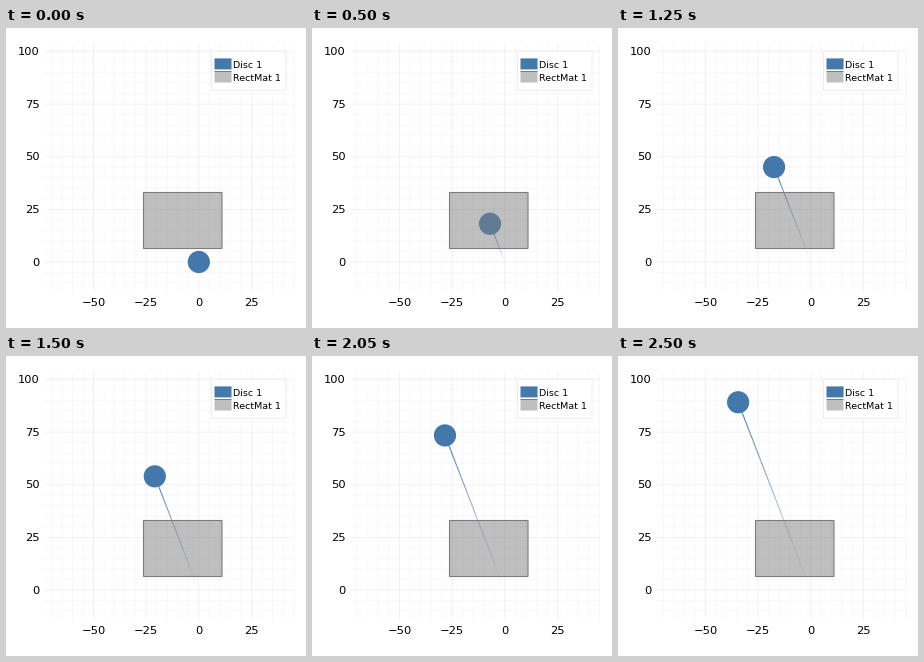
Write a matplotlib script that moves like this. It is 300 px wide and 300 px high and loops after 2.55 s.

```python
import numpy as np
import matplotlib.pyplot as plt
from matplotlib.animation import FuncAnimation
from matplotlib.collections import LineCollection
from matplotlib.colors import to_rgba
from matplotlib.patches import Circle, Rectangle

SIZE, DPI = 300, 100
FRAMES, INTERVAL = 51, 50
PX = 72 / DPI  # points per pixel
BLUE = "#4477aa"
EDGE = "#7c7c7c"
MAT = (0.5, 0.5, 0.5, 0.5)
SCALE = 2.106  # pixels per data unit
X0, Y0 = 192.8, 234  # pixel position of the data origin
LEFT, RIGHT, TOP, BOTTOM = 38.5, 288.5, 15, 264
TICK_SIZE, LEGEND_SIZE = 11.5, 9.5

plt.rcParams["font.family"] = "DejaVu Sans"
fig = plt.figure(figsize=(SIZE / DPI, SIZE / DPI), dpi=DPI, facecolor="white")
ax = fig.add_axes([0, 0, 1, 1])
ax.set_xlim(0, SIZE)
ax.set_ylim(SIZE, 0)
ax.axis("off")


def px(x):
    return X0 + SCALE * x


def py(y):
    return Y0 - SCALE * y


def line(xs, ys, color, alpha=1.0, z=1):
    ax.plot(xs, ys, color=color, alpha=alpha, lw=PX, zorder=z, snap=False,
            solid_capstyle="butt")


def box(x, y, w, h, z, **style):
    ax.add_patch(Rectangle((x, y), w, h, zorder=z, snap=False, **style))


def label(x, y, text, size, **align):
    ax.text(x, y, text, fontsize=size * PX, color="black", zorder=12, **align)


def draw_grid():
    for x in range(-70, 46, 5):
        alpha = 0.055 if x % 25 == 0 else 0.028
        line([px(x)] * 2, [TOP, BOTTOM], "black", alpha)
    for y in range(-10, 101, 5):
        alpha = 0.055 if y % 25 == 0 else 0.028
        line([LEFT, RIGHT], [py(y)] * 2, "black", alpha)
    for x in (-50, -25, 0, 25):
        label(px(x), 277.8, str(x).replace("-", "\u2212"), TICK_SIZE,
              ha="center", va="baseline")
    for y in range(0, 101, 25):
        label(33.8, py(y) + 3.8, str(y), TICK_SIZE, ha="right", va="baseline")


def draw_legend():
    box(205.5, 23.2, 74.5, 39.3, 10, fc="white", ec="#ececec", lw=PX)
    box(208.5, 30.4, 17, 11, 11, fc=BLUE, ec="none")
    box(208.5, 43.5, 17, 11, 11, fc=MAT, ec="none")
    line([208.5, 225.5], [43.5, 43.5], EDGE, z=12)
    label(226.6, 39.9, "Disc 1", LEGEND_SIZE, ha="left", va="baseline")
    label(226.6, 52.9, "RectMat 1", LEGEND_SIZE, ha="left", va="baseline")


def position(i):
    """Disc centre in pixels, slowing slightly along a straight path."""
    d = 3.84 * i - 0.0017 * i ** 2
    return X0 - 0.387 * d, Y0 - d


draw_grid()
draw_legend()

trail = LineCollection([], linewidths=1.1 * PX, zorder=3, capstyle="butt")
ax.add_collection(trail, autolim=False)
disc = ax.add_patch(Circle(position(0), 11.1, fc=BLUE, ec="none", zorder=4))
box(137.5, 164.5, 78.5, 56, 5, fc=MAT, ec="none")
box(137.5, 164.5, 78.5, 56, 6, fc="none", ec=EDGE, lw=1.1 * PX)


def update(i):
    disc.center = position(i)
    points = [position(k) for k in range(i + 1)]
    trail.set_segments([np.array(pair) for pair in zip(points, points[1:])])
    trail.set_color([to_rgba(BLUE, (k + 0.5) / i) for k in range(i)])
    return trail, disc


anim = FuncAnimation(fig, update, frames=FRAMES, interval=INTERVAL,
                     repeat=True, repeat_delay=0)
plt.show()
```
